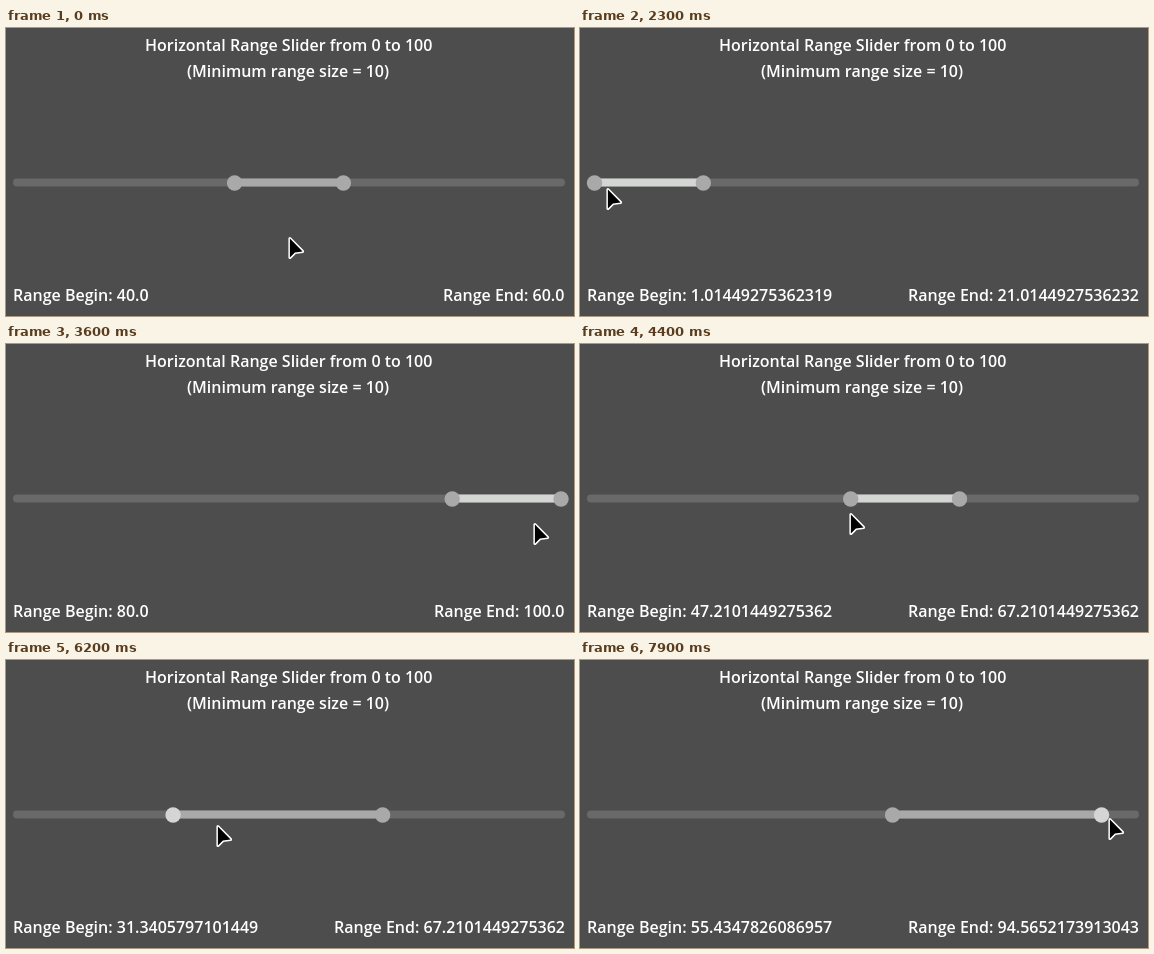
An HTML page with a canvas for the animation above (8000 ms loop, 568 by 288 pixels).

```html
<!DOCTYPE html>
<html lang="en">
<head>
<meta charset="utf-8">
<title>Range slider</title>
<style>
  html, body { margin: 0; width: 100%; height: 100%; overflow: hidden; background: #4d4d4d; }
  canvas, svg { position: absolute; left: 0; top: 0; width: 568px; height: 288px; }
  text { font: 600 16px "Open Sans", "Noto Sans", sans-serif; fill: #fff; }
</style>
</head>
<body>
<canvas id="stage" width="568" height="288"></canvas>
<svg width="568" height="288">
  <text id="title" y="23"></text>
  <text id="note" y="49"></text>
  <text id="begin" y="273"></text>
  <text id="end" y="273"></text>
</svg>
<script>
const LOOP = 8000, STEP = 100, LAG = 20;
const LEFT = 7, WIDTH = 552, SPAN = WIDTH / 5;   // track and dragged range, in px
const BAR = '#696969', NORMAL = '#a9a9a9', BRIGHT = '#d4d6d4';
const SOLO = 5000;                               // from here the handles move one by one

const ctx = document.getElementById('stage').getContext('2d');

// Monotone cubic through [time, value, speed] keys; speed is optional.
// Equal neighbours hold still.
function curve(keys) {
  const last = keys.length - 1;
  const rate = i => (keys[i + 1][1] - keys[i][1]) / (keys[i + 1][0] - keys[i][0]);
  const speed = keys.map(([, , given], i) => {
    if (given !== undefined) return given;
    if (i === 0 || i === last) return 0;
    const a = rate(i - 1), b = rate(i);
    return a * b > 0 ? 2 * a * b / (a + b) : 0;
  });
  return t => {
    if (t <= keys[0][0]) return keys[0][1];
    if (t >= keys[last][0]) return keys[last][1];
    const i = keys.findIndex(k => k[0] > t) - 1;
    const [t0, a] = keys[i], [t1, b] = keys[i + 1];
    if (a === b) return a;
    const h = t1 - t0, u = (t - t0) / h, v = 1 - u;
    return a * v * v * (1 + 2 * u) + b * u * u * (3 - 2 * u)
      + h * u * v * (speed[i] * v - speed[i + 1] * u);
  };
}

const beginAt = curve([
  [1000, 2 * SPAN], [1500, 134.6], [1900, 0, -0.3],
  [2200, 0], [2900, 300.6, 0.9], [3300, 4 * SPAN],
  [3600, 4 * SPAN], [4400, 260.6, -0.135],
  [SOLO, 260.6], [6000, 119], [6200, 173, 0.81], [6600, 306]
]);
const soloEnd = curve([[7400, 371], [7900, 522, 0.175]]);
const endAt = t => t < SOLO ? beginAt(t) + SPAN : soloEnd(t);

const path = [
  [100, 282, 208], [700, 265, 151], [1000, 265, 151], [1500, 155, 152],
  [2000, 0, 158], [2200, 4, 158], [2900, 419, 173], [3400, 545, 180],
  [3500, 545, 180], [3600, 527, 178], [4400, 269, 168], [4800, 266, 157],
  [SOLO, 266, 157], [6000, 131, 161], [6200, 210, 164], [6800, 348, 166],
  [7100, 384, 158], [7400, 381, 157], [7900, 528, 157]
];
const cursorX = curve(path.map(([t, x]) => [t, x]));
const cursorY = curve(path.map(([t, , y]) => [t, y]));

// Dragging moves in whole pixels; the range keeps its fractional offset.
function snap(px, t) {
  if (px % (2 * SPAN) === 0) return px;
  const off = t < SOLO + STEP ? 0.6 : 0;
  return Math.round(px - off) + off;
}

function format(px) {
  const s = String(+(px / WIDTH * 100).toPrecision(15));
  return s.includes('.') ? s : s + '.0';
}

// Labels start on a whole pixel; align is 0 for left, 0.5 for centre, 1 for right.
function label(id, content, align) {
  const el = document.getElementById(id);
  if (el.textContent === content) return;
  el.textContent = content;
  const free = WIDTH - Math.ceil(el.getComputedTextLength());
  el.setAttribute('x', LEFT + Math.floor(free * align));
}

function bar(x0, x1, r, color) {
  ctx.fillStyle = color;
  ctx.beginPath();
  ctx.roundRect(x0, 150.5, x1 - x0, 8, r);
  ctx.fill();
}

function handle(x, bright) {
  ctx.fillStyle = bright ? BRIGHT : NORMAL;
  ctx.beginPath();
  ctx.arc(x, 155, 7.7, 0, Math.PI * 2);
  ctx.fill();
}

function cursor(x, y) {
  const shape = [[1.9, 2.6], [1.9, 21.6], [6.9, 16.6], [14.6, 15.4]];
  ctx.beginPath();
  shape.forEach(([dx, dy]) => ctx.lineTo(x + dx, y + dy));
  ctx.closePath();
  ctx.lineJoin = 'round';
  ctx.lineWidth = 3;
  ctx.strokeStyle = '#fff';
  ctx.stroke();
  ctx.fillStyle = '#000';
  ctx.fill();
}

function draw(t) {
  const toX = px => 11 + px * 544 / WIDTH;
  const x0 = toX(beginAt(t - LAG)), x1 = toX(endAt(t - LAG));
  const within = (a, b) => t >= a && t < b;

  ctx.fillStyle = '#4d4d4d';
  ctx.fillRect(0, 0, 568, 288);
  bar(LEFT, LEFT + WIDTH, 4, BAR);
  bar(x0, x1, 0, within(600, 4600) ? BRIGHT : NORMAL);
  handle(x0, within(4600, 6700));
  handle(x1, t >= 7000);
  cursor(Math.round(cursorX(t)), Math.round(cursorY(t)));

  const begin = snap(beginAt(t), t);
  const end = t < SOLO ? begin + SPAN : Math.round(soloEnd(t));
  label('begin', 'Range Begin: ' + format(begin), 0);
  label('end', 'Range End: ' + format(end), 1);
}

label('title', 'Horizontal Range Slider from 0 to 100', 0.5);
label('note', '(Minimum range size = 10)', 0.5);

const start = performance.now();
function tick() {
  const t = (performance.now() - start) % LOOP;
  draw(Math.floor(t / STEP) * STEP);
  requestAnimationFrame(tick);
}
tick();
</script>
</body>
</html>
```
